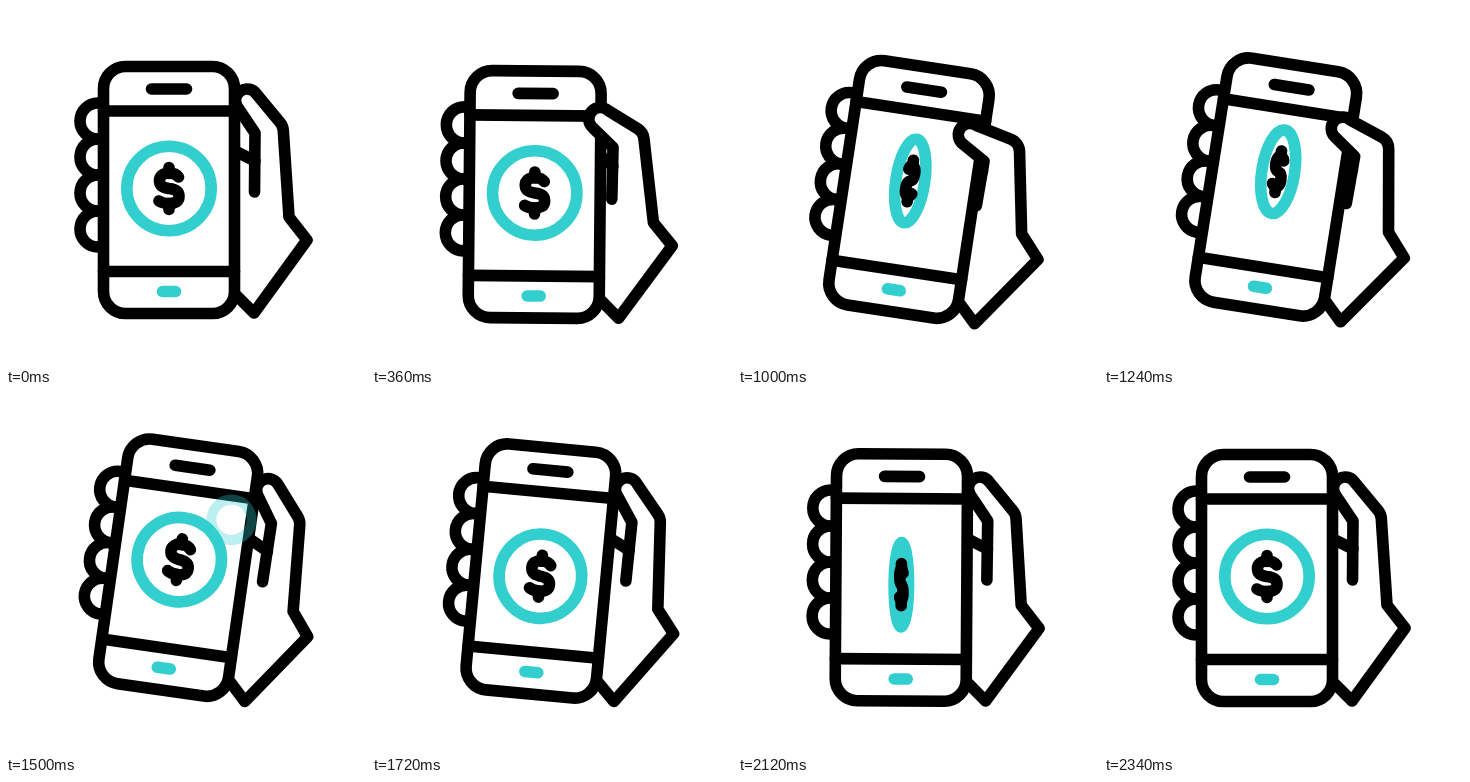
These frames come from a looping animation (360x360 px, 2820 ms). An HTML page with a canvas:

```html
<!DOCTYPE html>
<html lang="en">
<head>
<meta charset="utf-8">
<style>
  html, body { margin: 0; width: 100%; height: 100%; overflow: hidden; background: #fff; }
  canvas { display: block; width: 360px; height: 360px; }
</style>
</head>
<body>
<canvas id="stage" width="360" height="360"></canvas>
<script>
const ctx = document.getElementById('stage').getContext('2d');
const LOOP = 2820, TEAL = '#33cfcf', INK = '#000', PAPER = '#fff';

// Eased progress from 0 to 1 between two times
const ease = (t, from, to) => {
  const u = Math.min(1, Math.max(0, (t - from) / (to - from)));
  return (1 - Math.cos(Math.PI * u)) / 2;
};
const mix = (a, b, k) => a + (b - a) * k;
const mixPoint = (a, b, k) => [mix(a[0], b[0], k), mix(a[1], b[1], k)];

// Squeezing the path horizontally leaves the stroke width unchanged
function shape(build, stroke = INK, fill = null, squeeze = 1) {
  ctx.beginPath();
  ctx.save();
  ctx.scale(squeeze, 1);
  build();
  ctx.restore();
  if (fill) { ctx.fillStyle = fill; ctx.fill(); }
  if (stroke) { ctx.strokeStyle = stroke; ctx.stroke(); }
}
const line = (x1, y1, x2, y2, color) =>
  shape(() => { ctx.moveTo(x1, y1); ctx.lineTo(x2, y2); }, color);

function drawFingers() {
  for (let i = 0; i < 4; i++) {
    const y = 115 + 36 * i;
    shape(() => {
      ctx.moveTo(97, y - 18);
      ctx.arc(92, y, 18, -Math.PI / 2, Math.PI / 2, true);
      ctx.lineTo(97, y + 18);
    });
  }
}

function drawPhone() {
  shape(() => ctx.roundRect(97.5, 60.5, 131, 247, 22), INK, PAPER);
  line(97.5, 105, 228.5, 105);
  line(97.5, 265.5, 228.5, 265.5);
  line(145.5, 83, 180.5, 83);
  line(156.5, 285.5, 169.5, 285.5, TEAL);
}

function drawCoin(t) {
  const turns = ease(t, 740, 1440) + ease(t, 1640, 2340);
  const squeeze = Math.cos(turns * 2 * Math.PI);
  const lift = -14 * ease(t, 740, 1260) + 28 * ease(t, 1260, 1960) - 14 * ease(t, 1960, 2340);
  ctx.save();
  ctx.translate(163, 182.5 + lift);
  shape(() => ctx.arc(0, 0, 42.2, 0, 2 * Math.PI), TEAL, PAPER, squeeze);
  line(0, -21, 0, -15);
  line(0, 15, 0, 21);
  shape(() => {
    ctx.moveTo(9.5, -11.5);
    ctx.bezierCurveTo(7, -15, 4, -15.5, 0, -15.5);
    ctx.bezierCurveTo(-6, -15.5, -9.5, -12, -9.5, -8);
    ctx.bezierCurveTo(-9.5, -1, -3, -0.5, 0, 0);
    ctx.bezierCurveTo(5, 0.5, 10, 2, 10, 8);
    ctx.bezierCurveTo(10, 13, 6, 15, 0, 15);
    ctx.bezierCurveTo(-4, 15, -7, 14.5, -10, 12.5);
  }, INK, null, squeeze);
  ctx.restore();
}

function drawHand(fold) {
  const tip = mixPoint([241, 94.5], [215, 121], fold);
  const joint = mixPoint([249, 127], [233, 145], fold);
  const end = mixPoint([248.5, 186], [232, 190], fold);
  const elbow = mixPoint([277, 120], [265, 121], fold);
  const palm = mixPoint([283, 211], [281, 211], fold);
  const angle = mix(57, 27, fold) * Math.PI / 180;
  const thumb = () => {
    ctx.lineTo(...joint);
    ctx.arc(...tip, 11.5, angle + Math.PI / 2, angle + Math.PI * 1.5);
    ctx.arcTo(...elbow, ...palm, 14);
  };
  line(229, 145, joint[0], 155);
  shape(thumb, null, PAPER);
  shape(() => {
    ctx.moveTo(...end);
    thumb();
    ctx.lineTo(...palm);
    ctx.lineTo(301, 234);
    ctx.lineTo(248, 307);
    ctx.lineTo(231, 290);
  });
}

function drawRipple(t) {
  const u = (t - 1300) / 340;
  if (u <= 0 || u >= 1) return;
  ctx.save();
  ctx.globalAlpha = 0.8 * (1 - u);
  ctx.lineWidth = 10;
  shape(() => ctx.arc(209, 129, mix(3, 32, u), 0, 2 * Math.PI), TEAL);
  ctx.restore();
}

function draw(now) {
  const t = now % LOOP;
  const press = ease(t, 220, 500) - ease(t, 1160, 1440);
  const tilt = 9 * (ease(t, 220, 1120) - ease(t, 1320, 2240));
  ctx.fillStyle = PAPER;
  ctx.fillRect(0, 0, 360, 360);
  ctx.save();
  ctx.lineWidth = 11.6;
  ctx.lineCap = ctx.lineJoin = 'round';
  ctx.translate(240 - 1.7 * press, 243 + 10.3 * press);
  ctx.rotate(tilt * Math.PI / 180);
  ctx.translate(-240, -243);
  drawFingers();
  drawPhone();
  drawCoin(t);
  drawHand(press);
  drawRipple(t);
  ctx.restore();
}

const start = performance.now();
function tick() {
  draw(performance.now() - start);
  requestAnimationFrame(tick);
}
tick();
</script>
</body>
</html>
```
